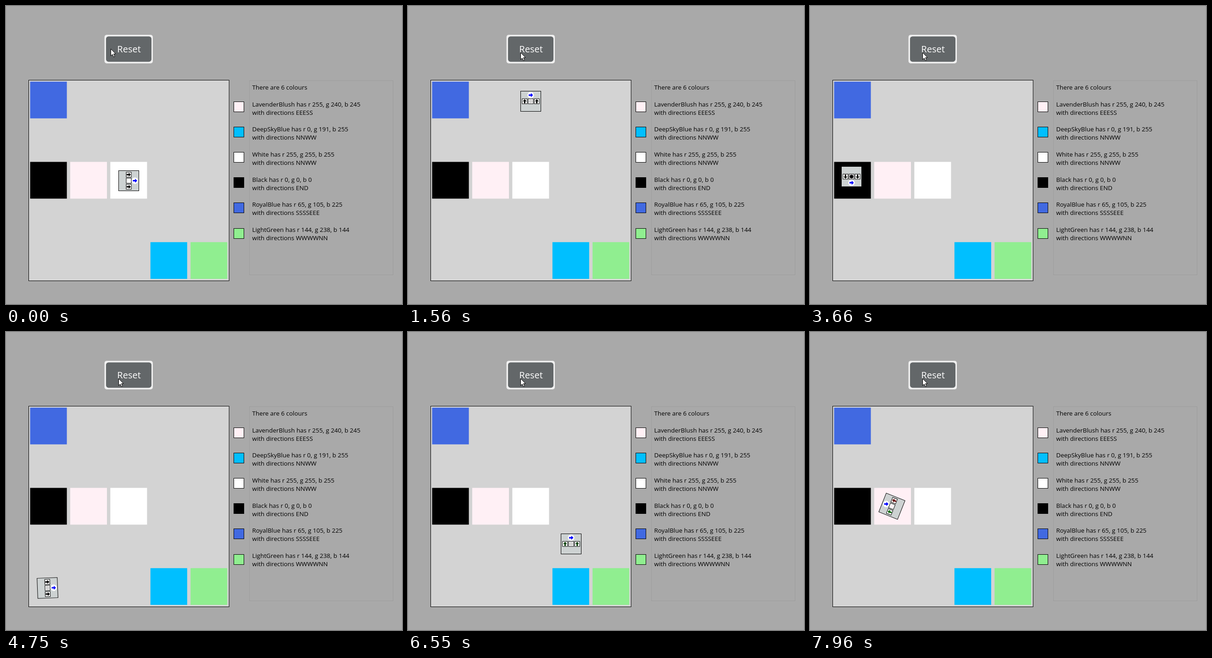
An HTML page for the animation above (7.99 s loop, 863 px wide and 649 px high).

```html
<!DOCTYPE html>
<html lang="en">
<head>
<meta charset="utf-8">
<title>Colour grid robot</title>
<style>
html, body { margin: 0; width: 100%; height: 100%; overflow: hidden; background: #a9a9a9; }
svg { display: block; width: 863px; height: 649px; }
text { font-family: "Open Sans", "Noto Sans", sans-serif; font-size: 13.4px; }
</style>
</head>
<body>
<svg id="stage" viewBox="0 0 863 649">
  <rect width="863" height="649" fill="#a9a9a9"/>
  <rect id="ring" x="214.6" y="62.8" width="105.4" height="62.2" rx="5" fill="#f0f0f0"/>
  <rect x="218" y="66.2" width="99" height="55.2" rx="5.5" fill="#636769"/>
  <text x="268" y="100.5" text-anchor="middle" fill="#fff" style="font-size:20px">Reset</text>
  <rect x="49.5" y="161.5" width="436.7" height="437" fill="#d3d3d3" stroke="#000"/>
  <rect x="530.5" y="162.5" width="313" height="423" fill="none" stroke="#9d9d9d"/>
  <text x="536.5" y="182">There are 6 colours</text>
  <g id="tiles"></g>
  <g id="legend"></g>
  <g id="robot">
    <rect x="-22" y="-22" width="44" height="44" fill="#cdd2d2" stroke="#000"/>
    <g fill="#fff" stroke="#000">
      <rect x="-5.5" y="-18.7" width="11" height="11"/>
      <rect x="-5.5" y="-5.5" width="11" height="11"/>
      <rect x="-5.5" y="7.7" width="11" height="11"/>
    </g>
    <circle id="sensor" r="4"/>
    <path id="left" transform="translate(0 -13.2)" d="M-4.5-1.5H0V-4.2L4.5 0L0 4.2V1.5H-4.5Z"/>
    <path id="right" transform="translate(0 13.2)" d="M-4.5-1.5H0V-4.2L4.5 0L0 4.2V1.5H-4.5Z"/>
    <g transform="translate(13.4 0)">
      <circle r="7" fill="#fff"/>
      <path id="gyro" fill="#00f" d="M-4.5-1.6H.3V-4.6L5 0L.3 4.6V1.6H-4.5Z"/>
    </g>
  </g>
  <path id="cursor" d="M.5.5V15.6L4 12.4L6.6 18L9 17L6.5 11.4H11Z" fill="#fff" stroke="#000"/>
</svg>
<script>
const LOOP = 7990, STEP = 88.5, FLOOR = "#d3d3d3";
const $ = id => document.getElementById(id);

// name, rgb, directions, column, row
const COLOURS = [
  ["LavenderBlush", [255, 240, 245], "EEESS", 1, 2],
  ["DeepSkyBlue", [0, 191, 255], "NNWW", 3, 4],
  ["White", [255, 255, 255], "NNWW", 2, 2],
  ["Black", [0, 0, 0], "END", 0, 2],
  ["RoyalBlue", [65, 105, 225], "SSSSEEE", 0, 0],
  ["LightGreen", [144, 238, 144], "WWWWNN", 4, 4]
];

function add(parent, tag, attrs, text) {
  const el = document.createElementNS("http://www.w3.org/2000/svg", tag);
  for (const key in attrs) el.setAttribute(key, attrs[key]);
  if (text) el.textContent = text;
  $(parent).append(el);
}

const tiles = COLOURS.map(([name, [r, g, b], dirs, col, row], i) => {
  const fill = `rgb(${r},${g},${b})`;
  const x = 52.6 + 87.4 * col, y = 164.7 + 87.4 * row;
  add("tiles", "rect", { x, y, width: 80, height: 80, fill });
  add("legend", "rect", { x: 496.5, y: Math.floor(208 + 55.2 * i) + 0.5, width: 22, height: 22, fill, stroke: "#000" });
  const base = 218.5 + 54.7 * i;
  add("legend", "text", { x: 536.5, y: base }, `${name} has r ${r}, g ${g}, b ${b}`);
  add("legend", "text", { x: 536.5, y: base + 18 }, `with directions ${dirs}`);
  return { x, y, fill };
});

// L and R turn, F drives one cell; one start time for each, plus the end
const PLAN = "LFFLFFLFFFFLFFFLFFLFFR";
const STARTS = [525, 938, 1257, 1582, 1979, 2294, 2616, 3010, 3358, 3705, 4008, 4310,
  4770, 5115, 5460, 5804, 6175, 6520, 6840, 7245, 7600, 7905, 8425];
const TURN = [[0, 0], [.17, .19], [.38, .5], [.55, .76], [.72, 1.03], [.8, 1.09], [.9, 1.06], [1, 1]];
const SWING = { L: -90, R: 180 };

// Cursor places, held until the next one
const MOUSE = [[0, 228, 93], [40, 140, 85], [70, 31, 78], [100, 77, 74],
  [240, 120, 61], [270, 185, 80], [300, 245, 101]];

function lerp(points, p) {
  const i = Math.max(1, points.findIndex(q => q[0] >= p));
  const [a, u] = points[i - 1], [b, v] = points[i];
  return u + (v - u) * (p - a) / (b - a);
}

const drive = p => p - 0.04 * Math.sin(2 * Math.PI * p);

function poseAt(t) {
  const pose = { x: 267.5, y: 380, angle: 0, left: 0, right: 0 };
  for (let i = 0; i < PLAN.length && t > STARTS[i]; i++) {
    const p = Math.min(1, (t - STARTS[i]) / (STARTS[i + 1] - STARTS[i]));
    const kind = PLAN[i];
    if (kind === "F") {
      const a = pose.angle * Math.PI / 180, d = STEP * drive(p);
      pose.x += d * Math.cos(a);
      pose.y += d * Math.sin(a);
      pose.left = pose.right = 65 * (1 - p);
    } else {
      pose.angle += SWING[kind] * lerp(TURN, p);
      const power = 125 * Math.max(0, 1 - 2 * p);
      pose.left = kind === "R" ? power : -power;
      pose.right = -pose.left;
    }
  }
  return pose;
}

const wheelColour = v => v < 0 ? `rgb(${-v},0,0)` : `rgb(0,${v},0)`;
const snap = v => Math.round(v - 0.5) + 0.5;

function draw(t) {
  const { x, y, angle, left, right } = poseAt(t);
  $("robot").setAttribute("transform", `translate(${snap(x)} ${snap(y)}) rotate(${angle})`);
  $("gyro").setAttribute("transform", `rotate(${-angle})`);
  // Wheel on the robot's left is the upper one when it faces east
  $("left").setAttribute("fill", wheelColour(kindSign(angle) * left));
  $("right").setAttribute("fill", wheelColour(kindSign(angle) * right));
  const under = tiles.find(c => x >= c.x && x < c.x + 80 && y >= c.y && y < c.y + 80);
  $("sensor").setAttribute("fill", under ? under.fill : FLOOR);

  const [, mx, my] = MOUSE.filter(m => m[0] <= t).pop();
  $("cursor").setAttribute("transform", `translate(${mx} ${my})`);
  $("ring").setAttribute("visibility", mx >= 215 ? "visible" : "hidden");
}

function kindSign() { return 1; }

const begin = performance.now();
function tick() {
  draw((performance.now() - begin) % LOOP);
  requestAnimationFrame(tick);
}
tick();
</script>
</body>
</html>
```
